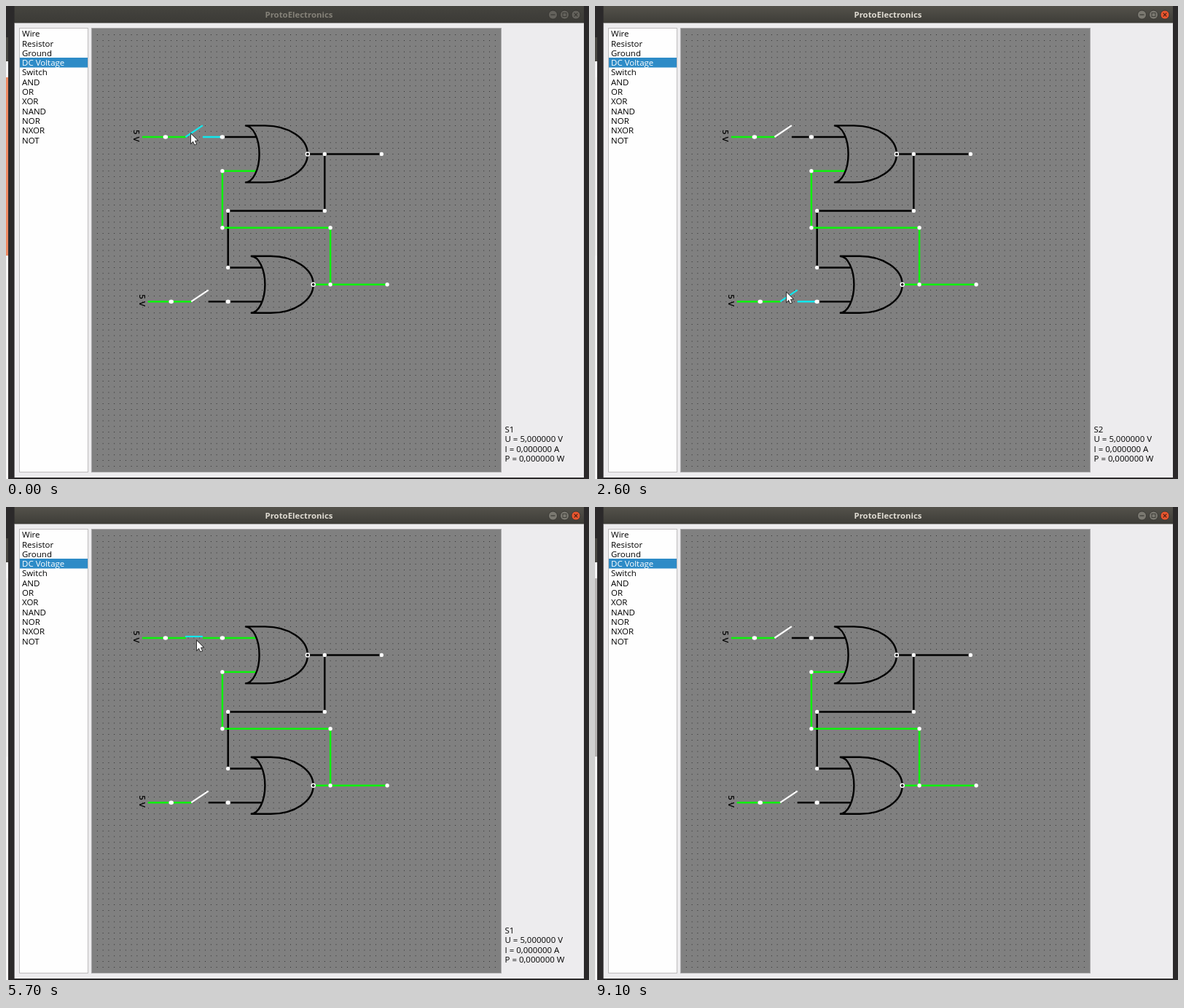
Recreate the animation shown at these times as an HTML page with a canvas. Size 800 by 650 pixels, loop 9200 ms.

```html
<!DOCTYPE html>
<html lang="en">
<head>
<meta charset="utf-8">
<title>ProtoElectronics</title>
<style>
  html, body { margin: 0; width: 100%; height: 100%; overflow: hidden; background: #2b292a; }
  canvas { display: block; }
</style>
</head>
<body>
<canvas id="stage" width="800" height="650"></canvas>
<script>
const ctx = document.getElementById('stage').getContext('2d');
const LOOP = 9200, PITCH = 7.8;
const GREEN = '#0cf20c', CYAN = '#10e8ee', BLACK = '#000', WHITE = '#fff';
const FONT = '"Open Sans", "Noto Sans", sans-serif';
const PARTS = ['Wire', 'Resistor', 'Ground', 'DC Voltage', 'Switch', 'AND', 'OR', 'XOR', 'NAND', 'NOR', 'NXOR', 'NOT'];

// Grid units to pixels
const gx = i => 117.5 + i * PITCH;
const gy = j => 31.8 + j * PITCH;

const between = (t, ...spans) => spans.some(([from, to]) => t >= from && t < to);

// Pointer path: [time, x, y]
const POINTER = [
  [1600, 254, 176], [2100, 252, 240], [2400, 252, 301], [2600, 263, 394],
  [4600, 263, 394], [4900, 267, 207], [5200, 260, 181], [5600, 260, 181], [5700, 262, 184]
];

function pointerAt(t) {
  const next = POINTER.findIndex(p => p[0] > t);
  if (next === 0) return POINTER[0].slice(1);
  if (next < 0) return POINTER[POINTER.length - 1].slice(1);
  const [t0, x0, y0] = POINTER[next - 1], [t1, x1, y1] = POINTER[next];
  const k = (t - t0) / (t1 - t0);
  return [x0 + (x1 - x0) * k, y0 + (y1 - y0) * k];
}

function stateAt(t) {
  return {
    active: t >= 600,
    closed1: between(t, [700, 1500], [5400, 6000], [6500, 6900]),
    closed2: between(t, [2900, 3600], [4200, 4600]),
    set: between(t, [2900, 5400]),
    hover: between(t, [0, 1800], [4800, 8600]) ? 1 : between(t, [2500, 4700]) ? 2 : 0,
    pointer: t < 8600 ? pointerAt(t) : null,
    backdrop: t < 1600 ? '#ee8a63' : t < 8900 ? '#f1f0ef' : t < 9100 ? '#d4d2d1' : '#b5b2b1'
  };
}

function rect(x, y, w, h, fill, border) {
  ctx.fillStyle = fill;
  ctx.fillRect(x, y, w, h);
  if (border) {
    ctx.strokeStyle = border;
    ctx.lineWidth = 1;
    ctx.strokeRect(x + 0.5, y + 0.5, w - 1, h - 1);
  }
}

function text(str, x, y, color = BLACK, font = '500 11.5px ' + FONT, align = 'left') {
  ctx.font = font;
  ctx.fillStyle = color;
  ctx.textAlign = align;
  ctx.fillText(str, x, y);
}

function line(color, width, ...points) {
  ctx.strokeStyle = color;
  ctx.lineWidth = width;
  ctx.beginPath();
  points.forEach(([x, y]) => ctx.lineTo(x, y));
  ctx.stroke();
}

const wire = (color, ...cells) => line(color, 2.5, ...cells.map(([i, j]) => [gx(i), gy(j)]));

function pin(i, j, wide = 2.7) {
  ctx.fillStyle = WHITE;
  ctx.beginPath();
  ctx.ellipse(gx(i), gy(j), wide, 2.7, 0, 0, 7);
  ctx.fill();
}

function titleButton(x, kind, active) {
  const close = kind === 'close' && active;
  ctx.beginPath();
  ctx.arc(x, 12, 6, 0, 7);
  ctx.fillStyle = close ? '#e9562f' : active ? '#7b7971' : '#64625c';
  ctx.fill();
  ctx.strokeStyle = '#34332f';
  ctx.lineWidth = 0.8;
  ctx.stroke();
  const ink = close ? '#4d2012' : '#3a3934';
  if (kind === 'min') line(ink, 1.2, [x - 3, 12], [x + 3, 12]);
  if (kind === 'max') ctx.strokeRect(x - 2.5, 9.5, 5, 5);
  if (kind === 'close') {
    line(ink, 1.2, [x - 2.3, 9.7], [x + 2.3, 14.3]);
    line(ink, 1.2, [x + 2.3, 9.7], [x - 2.3, 14.3]);
  }
}

function drawWindow(s) {
  rect(0, 0, 800, 650, '#2b292a');
  rect(0, 43, 3, 33, '#484641');
  rect(0, 76, 3, 574, '#f6f5f5');
  rect(0, 98, 3, 245, s.backdrop);

  const bar = ctx.createLinearGradient(0, 0, 0, 24);
  bar.addColorStop(0, s.active ? '#54524b' : '#45443f');
  bar.addColorStop(1, s.active ? '#3d3c37' : '#3b3a36');
  rect(11.6, 23, 781.4, 625, '#edecee');
  rect(11.6, 0, 781.4, 23.4, bar);
  text('ProtoElectronics', 402, 16, s.active ? '#e0dcd3' : '#858279', 'bold 11.4px ' + FONT, 'center');
  titleButton(750.5, 'min', s.active);
  titleButton(766.5, 'max', s.active);
  titleButton(782, 'close', s.active);

  rect(18, 30, 95, 611, '#fefefe', '#bebcbd');
  rect(19, 71, 93, 13.5, '#2d8bc7');
  PARTS.forEach((name, i) => text(name, 22, 42.2 + i * 13.3, i === 3 ? WHITE : BLACK));

  rect(117, 30, 563, 611, '#808080', '#a9a8a9');
  ctx.fillStyle = BLACK;
  for (let i = 1; i < 72; i++)
    for (let j = 1; j < 78; j++) ctx.fillRect(gx(i) - 0.4, gy(j) - 0.4, 0.8, 0.8);

  if (s.hover) {
    ['S' + s.hover, 'U = 5,000000 V', 'I = 0,000000 A', 'P = 0,000000 W']
      .forEach((row, i) => text(row, 684.5, 586 + i * 13.4));
  }
}

// Source, switch and input lead; (i, j) is the pin between source and switch
function drawInput(i, j, closed, hover) {
  const x = gx(i), y = gy(j);
  ctx.save();
  ctx.translate(x - 43.5, y - 10);
  ctx.rotate(Math.PI / 2);
  text('5 V', 0, 0, BLACK, '600 11.5px ' + FONT);
  ctx.restore();

  const lever = hover ? CYAN : WHITE;
  const lead = closed ? GREEN : BLACK;
  line(GREEN, 2.5, [x - 32, y], [x + 28, y]);
  line(closed ? GREEN : hover ? CYAN : BLACK, 2.5, [x + 51, y], [x + 78, y]);
  line(lead, 2.5, [x + 78, y], [x + 125, y]);
  if (closed) line(lever, 2.2, [x + 27, y - 2], [x + 51, y - 2]);
  else line(lever, 2.2, [x + 27.5, y], [x + 51, y - 15.8]);
  pin(i, j, 3.3);
  pin(i + 10, j, 3.3);
}

function drawGate(i, j) {
  const tip = gx(i), y = gy(j), back = gx(i - 11), half = 5 * PITCH, nose = 7.5 * PITCH;
  ctx.strokeStyle = BLACK;
  ctx.lineWidth = 2.4;
  ctx.beginPath();
  ctx.moveTo(back, y - half);
  ctx.ellipse(tip - nose, y, nose, half, 0, -Math.PI / 2, Math.PI / 2);
  ctx.lineTo(back, y + half);
  ctx.ellipse(back, y, 2.5 * PITCH, half, 0, Math.PI / 2, -Math.PI / 2, true);
  ctx.stroke();
  ctx.beginPath();
  ctx.arc(tip, y, 2.5, 0, 7);
  ctx.fillStyle = BLACK;
  ctx.fill();
  ctx.strokeStyle = WHITE;
  ctx.lineWidth = 1.5;
  ctx.stroke();
}

function drawCircuit(s) {
  const upper = s.set ? GREEN : BLACK, lower = s.set ? BLACK : GREEN;
  drawInput(13, 19, s.closed1, s.hover === 1);
  drawInput(14, 48, s.closed2, s.hover === 2);
  wire(upper, [38, 22], [51, 22]);
  wire(upper, [41, 22], [41, 32], [24, 32], [24, 42], [29.9, 42]);
  wire(lower, [39, 45], [52, 45]);
  wire(lower, [42, 45], [42, 35], [23, 35], [23, 25], [28.9, 25]);
  drawGate(38, 22);
  drawGate(39, 45);
  [[41, 22], [51, 22], [41, 32], [24, 32], [24, 42],
   [42, 45], [52, 45], [42, 35], [23, 35], [23, 25]].forEach(([i, j]) => pin(i, j));
}

function drawPointer([x, y]) {
  ctx.save();
  ctx.translate(x, y);
  ctx.beginPath();
  [[0, 0], [0, 12.5], [2.8, 9.8], [5, 14.5], [7, 13.6], [4.9, 8.9], [8.6, 8.6]]
    .forEach(p => ctx.lineTo(...p));
  ctx.closePath();
  ctx.strokeStyle = '#222';
  ctx.lineWidth = 1.6;
  ctx.stroke();
  ctx.fillStyle = WHITE;
  ctx.fill();
  ctx.restore();
}

function frame(now) {
  const state = stateAt(Math.floor((now % LOOP) / 100) * 100);
  drawWindow(state);
  drawCircuit(state);
  if (state.pointer) drawPointer(state.pointer);
  requestAnimationFrame(frame);
}

requestAnimationFrame(frame);
</script>
</body>
</html>
```
